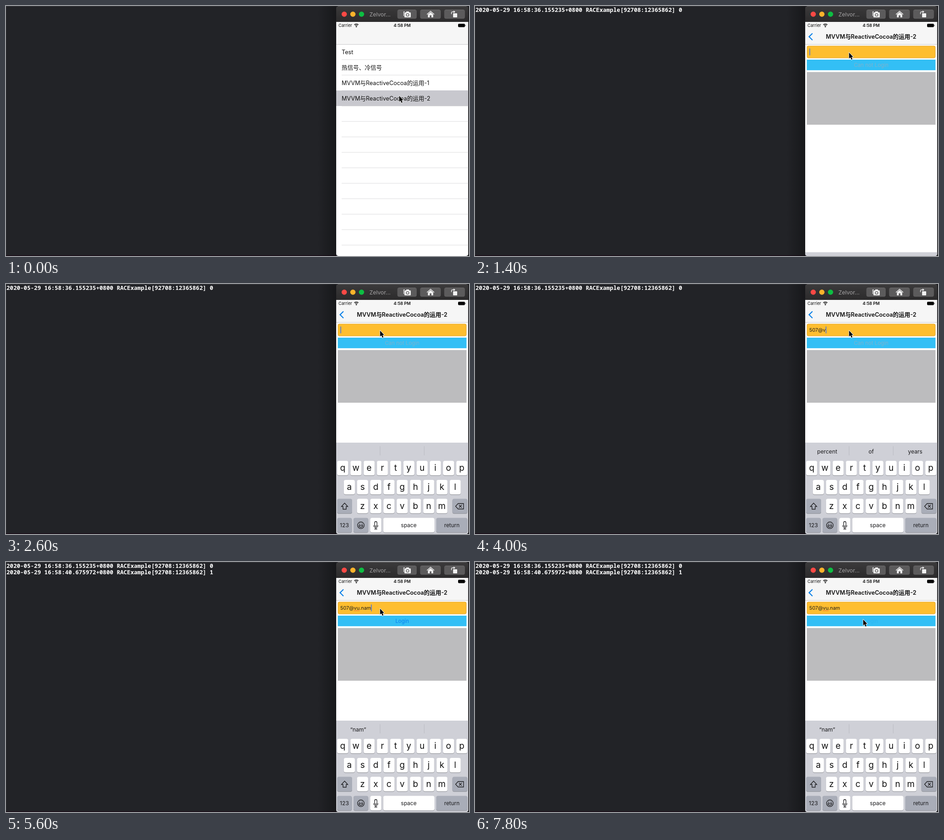
An HTML page with a canvas that plays this animation: 1018 px wide and 550 px high, repeating every 8000 ms.

```html
<!DOCTYPE html>
<html lang="en">
<head>
<meta charset="utf-8">
<title>Login form demo</title>
<style>
  html, body { margin: 0; width: 100%; height: 100%; overflow: hidden; background: #222327; }
  canvas { display: block; }
</style>
</head>
<body>
<canvas id="stage" width="1018" height="550"></canvas>
<script>
const ctx = document.getElementById('stage').getContext('2d');
const LOOP = 8000, STEP = 200;
const UI = 'Inter, "Noto Sans CJK SC", "Noto Sans CJK", sans-serif';
const MONO = '"Noto Sans Mono", monospace';
const LEFT = 726, RIGHT = 1016.5, WIDTH = RIGHT - LEFT, MID = 871;
const TITLE = 'MVVM与ReactiveCocoa的运用-2';
const ROWS = ['Test', '热信号、冷信号', 'MVVM与ReactiveCocoa的运用-1', TITLE];
const EMAIL = '507@vu.nam';

const clamp = v => Math.max(0, Math.min(1, v));
const ease = v => { v = clamp(v); return v * v * (3 - 2 * v); };
// Remaining distance of a critically damped spring
const spring = v => v <= 0 ? 1 : (1 + v) * Math.exp(-v);

function rect(x, y, w, h, color) {
  ctx.fillStyle = color;
  ctx.fillRect(x, y, w, h);
}

function round(x, y, w, h, r, color) {
  ctx.beginPath();
  ctx.roundRect(x, y, w, h, r);
  ctx.fillStyle = color;
  ctx.fill();
}

function dot(x, y, r, color) {
  ctx.beginPath();
  ctx.arc(x, y, r, 0, 7);
  ctx.fillStyle = color;
  ctx.fill();
}

function text(str, x, y, size, color, align = 'left', weight = 400, family = UI) {
  ctx.font = `${weight} ${size}px ${family}`;
  ctx.textAlign = align;
  ctx.fillStyle = color;
  ctx.fillText(str, x, y);
}

function trace(points, close) {
  ctx.beginPath();
  points.forEach(([x, y]) => ctx.lineTo(x, y));
  if (close) ctx.closePath();
}

function line(points, color, width, close) {
  trace(points, close);
  ctx.strokeStyle = color;
  ctx.lineWidth = width;
  ctx.stroke();
}

function poly(points, color) {
  trace(points, true);
  ctx.fillStyle = color;
  ctx.fill();
}

function layer(draw, x = 0, y = 0, alpha = 1) {
  ctx.save();
  ctx.translate(x, y);
  ctx.globalAlpha *= alpha;
  draw();
  ctx.restore();
}

function drawConsole(t) {
  rect(0, 0, 1018, 550, '#222327');
  rect(0, 0, LEFT, 1, '#3b3c40');
  rect(0, 1, 1, 548, '#2b2c30');
  rect(0, 548, LEFT, 2, '#1d131d');
  const shade = ctx.createLinearGradient(685, 0, LEFT, 0);
  shade.addColorStop(0, 'rgba(0,0,0,0)');
  shade.addColorStop(1, 'rgba(0,0,0,.32)');
  rect(685, 0, 41, 550, shade);
  rect(RIGHT, 0, 2, 550, '#18181a');

  const log = (time, value, y) =>
    text(`2020-05-29 16:58:${time}+0800 RACExample[92708:12365862] ${value}`,
      1, y, 12.63, '#fff', 'left', 700, MONO);
  if (t >= 200) log('36.155235', 0, 12.5);
  if (t >= 4800) log('40.675972', 1, 27.3);
}

function drawTitleBar() {
  const bar = ctx.createLinearGradient(0, 0, 0, 35);
  bar.addColorStop(0, '#3b3a3b');
  bar.addColorStop(1, '#2c2b2c');
  round(LEFT, 0, WIDTH, 40, [5, 5, 0, 0], bar);
  rect(LEFT + 4, 0, WIDTH - 8, 1, '#666');
  dot(743.7, 18, 5.8, '#fc4945');
  dot(762.7, 18, 5.8, '#fdb32b');
  dot(781.7, 18, 5.8, '#0dbe42');
  text('Zelvor...', 799, 22.5, 12.3, '#a3a2a3');
  for (const [x, w] of [[860.5, 42.5], [910.5, 45.5], [963.5, 45.5]]) {
    round(x, 8, w, 20, 4, '#5c5b5c');
    rect(x + 3, 8, w - 6, 1, '#6f6e6f');
  }
  // Camera
  line([[877, 12.5], [874.5, 12.5], [874.5, 22]], '#eee', 1.2);
  round(876, 14, 14, 11, 1.5, '#f2f2f2');
  rect(880, 12, 6, 3, '#f2f2f2');
  dot(883, 19.5, 3.6, '#5c5b5c');
  dot(883, 19.5, 2.2, '#f2f2f2');
  // House
  line([[925.5, 18.5], [933.5, 11.5], [941.5, 18.5]], '#f2f2f2', 1.6);
  poly([[933.5, 13.5], [939.3, 18.6], [939.3, 25], [935.3, 25], [935.3, 20.5],
    [931.7, 20.5], [931.7, 25], [927.7, 25], [927.7, 18.6]], '#f2f2f2');
  // Rotate
  round(983, 16, 9, 9, 1, '#f2f2f2');
  line([[979.5, 18], [979.5, 14], [981, 12.7], [985, 12.7]], '#f2f2f2', 1.4);
  poly([[984, 10], [988, 12.7], [984, 15.4]], '#f2f2f2');
}

function drawNav(progress) {
  rect(LEFT, 35, WIDTH, 49, '#f6f6f6');
  rect(LEFT, 84, WIDTH, .8, '#bdbdbf');
  text('Carrier', 731, 46.3, 9.2, '#111');
  ctx.strokeStyle = '#111';
  ctx.lineWidth = 1.5;
  for (const r of [3.8, 6.6]) {
    ctx.beginPath();
    ctx.arc(770.3, 46, r, -2.35, -.79);
    ctx.stroke();
  }
  dot(770.3, 45.4, 1.3, '#111');
  text('4:58 PM', MID, 46.3, 9.2, '#111', 'center', 600);
  round(994, 39, 15, 7.5, 2, '#050505');
  rect(1009.6, 41.3, 1.2, 3, '#555');

  if (progress <= 0) return;
  layer(() => {
    line([[742, 60.3], [734.5, 67.6], [742, 75]], '#0b80e8', 2.2);
  }, 0, 0, progress);
  layer(() => text(TITLE, MID, 72.1, 12.7, '#111', 'center', 600),
    (1 - progress) * 120, 0, progress);
}

function drawList() {
  rect(LEFT, 84, WIDTH, 466, '#fff');
  for (let y = 118; y < 550; y += 34) rect(738, y - .5, RIGHT - 738, 1, '#dcdcde');
  rect(LEFT, 186, WIDTH, 34, '#c8c8ce');
  ROWS.forEach((label, i) => text(label, 738, 105.7 + i * 34, 12.7, '#111'));
}

function typed(t) {
  if (t < 3400) return 0;
  if (t < 3800) return (t - 3200) / STEP;
  return Math.min(EMAIL.length, 4 + (t - 3800) / STEP);
}

function caretShown(t) {
  if (t < 1400 || t >= 7600) return false;
  const hidden = [[2200, 2600], [3000, 3400], [5800, 6200], [6600, 7000]];
  return !hidden.some(([from, to]) => t >= from && t < to);
}

function drawForm(t) {
  rect(LEFT, 84, WIDTH, 466, '#fff');
  round(729.5, 87.5, 283, 27.3, 4, '#d69b2b');
  round(730.3, 88.3, 281.4, 25.7, 3.5, '#febe30');

  const count = typed(t);
  const value = EMAIL.slice(0, count);
  text(value, 735, 104.7, 10.9, '#1b1b1b');
  const end = 735 + ctx.measureText(value).width;
  if (t >= 5000) {
    const from = 735 + ctx.measureText(EMAIL.slice(0, 4)).width;
    const to = 735 + ctx.measureText(EMAIL.slice(0, 6)).width;
    for (let x = from; x < to - 1; x += 2.2) rect(x, 106.5, 1.4, 1.2, '#e8502e');
  }
  if (caretShown(t)) rect(end + (count ? 0 : .3), 93.5, 1.6, 15, '#4672e0');

  rect(729.5, 118, 283, 23.3, '#33bff5');
  if (t < 4800) text('Can not Login', MID, 134.2, 11.6, '#7db2cd', 'center');
  else layer(() => text('Login', MID, 134.2, 11.4, '#087ff0', 'center'),
    0, 0, t >= 7800 ? .12 : 1);
  rect(729.5, 145.3, 283, 115.9, '#bcbcbe');
}

function key(x, y, w, color) {
  round(x, y + 1, w, 32, 4, '#898b91');
  round(x, y, w, 32, 4, color);
}

function letters(row, firstX, y) {
  [...row].forEach((ch, i) => {
    const x = firstX + i * 29.1;
    key(x - 12, y, 24.2, '#fff');
    text(ch, x, y + 22, 19, '#111', 'center');
  });
}

function suggestions(t) {
  if (t >= 3600 && t < 4400) return ['percent', 'of', 'years'];
  return t >= 5000 ? ['“nam”'] : [];
}

function drawKeyboard(t) {
  const grey = '#a9adb8', ink = '#1a1a1c';
  rect(LEFT, 349, WIDTH, 201, '#cfd0d7');
  for (const x of [822, 919]) rect(x, 357, 1, 20, '#bbbcc3');
  suggestions(t).forEach((word, i) => text(word, 774.3 + i * 96.8, 373, 12.2, ink, 'center'));

  letters('qwertyuiop', 740.2, 389);
  letters('asdfghjkl', 754.8, 431);
  letters('zxcvbnm', 783.8, 472.5);
  key(728, 472.5, 33, grey);
  key(981.5, 472.5, 33, grey);
  key(728, 514.5, 32.5, grey);
  key(764, 514.5, 32.5, grey);
  key(801, 514.5, 24.2, '#fff');
  key(829.5, 514.5, 112.5, '#fff');
  key(946, 514.5, 68.5, grey);
  text('123', 744, 535.2, 12.2, ink, 'center');
  text('space', 885.5, 534.8, 12, ink, 'center');
  text('return', 980.3, 534.8, 11.9, ink, 'center');

  // Shift and delete
  line([[744.5, 482], [751.5, 489.5], [748, 489.5], [748, 495.5], [741, 495.5],
    [741, 489.5], [737.5, 489.5]], ink, 1.3, true);
  line([[988.5, 489], [994, 483], [1006, 483], [1006, 495], [994, 495]], ink, 1.3, true);
  line([[996, 486], [1002, 492]], ink, 1.3);
  line([[1002, 486], [996, 492]], ink, 1.3);

  // Smiley
  ctx.beginPath();
  ctx.arc(780.3, 530.8, 7.3, 0, 7);
  ctx.stroke();
  dot(777.7, 528.5, 1.1, ink);
  dot(782.9, 528.5, 1.1, ink);
  ctx.beginPath();
  ctx.arc(780.3, 531, 4.3, .1, 3.04);
  ctx.closePath();
  ctx.stroke();

  // Microphone
  ctx.beginPath();
  ctx.roundRect(810.6, 522.5, 5, 10.5, 2.5);
  ctx.stroke();
  ctx.beginPath();
  ctx.arc(813.1, 531, 4.7, 0, Math.PI);
  ctx.stroke();
  line([[813.1, 535.7], [813.1, 539]], ink, 1.3);
  line([[810, 539], [816.2, 539]], ink, 1.3);
}

function drawCursor(t) {
  const a = ease((t - 600) / 700), b = ease((t - 6200) / 1000);
  layer(() => {
    const arrow = [[0, 0], [0, 13.2], [2.9, 10.5], [5, 15.6], [7.3, 14.6], [5.2, 9.7], [9, 9.7]];
    ctx.lineJoin = 'round';
    line(arrow, '#f4f4f4', 1.8, true);
    poly(arrow, '#050505');
  }, 864.5 - 42 * a + 31 * b, 197.5 - 95 * a + 24 * b);
}

function drawScene(t) {
  const left = t >= 600 ? 0 : spring((t - 30) / 58);
  const progress = 1 - left;
  drawConsole(t);
  ctx.save();
  ctx.beginPath();
  ctx.roundRect(LEFT, 0, WIDTH, 550, 5);
  ctx.clip();
  drawTitleBar();
  if (left > 0) {
    layer(drawList, -.3 * WIDTH * progress);
    rect(LEFT, 84, WIDTH, 466, `rgba(0,0,0,${.08 * progress})`);
  }
  if (progress > 0) layer(() => drawForm(t), WIDTH * left);
  drawNav(progress);
  if (t >= 1400) {
    const drop = t >= 2000 ? 0 : 201 * spring((t - 1382) / 56.3);
    layer(() => drawKeyboard(t), 0, drop);
  }
  ctx.restore();
  drawCursor(t);
}

const start = performance.now();
function tick() {
  const time = (performance.now() - start) % LOOP;
  drawScene(Math.floor(time / STEP) * STEP);
  requestAnimationFrame(tick);
}
tick();
</script>
</body>
</html>
```
